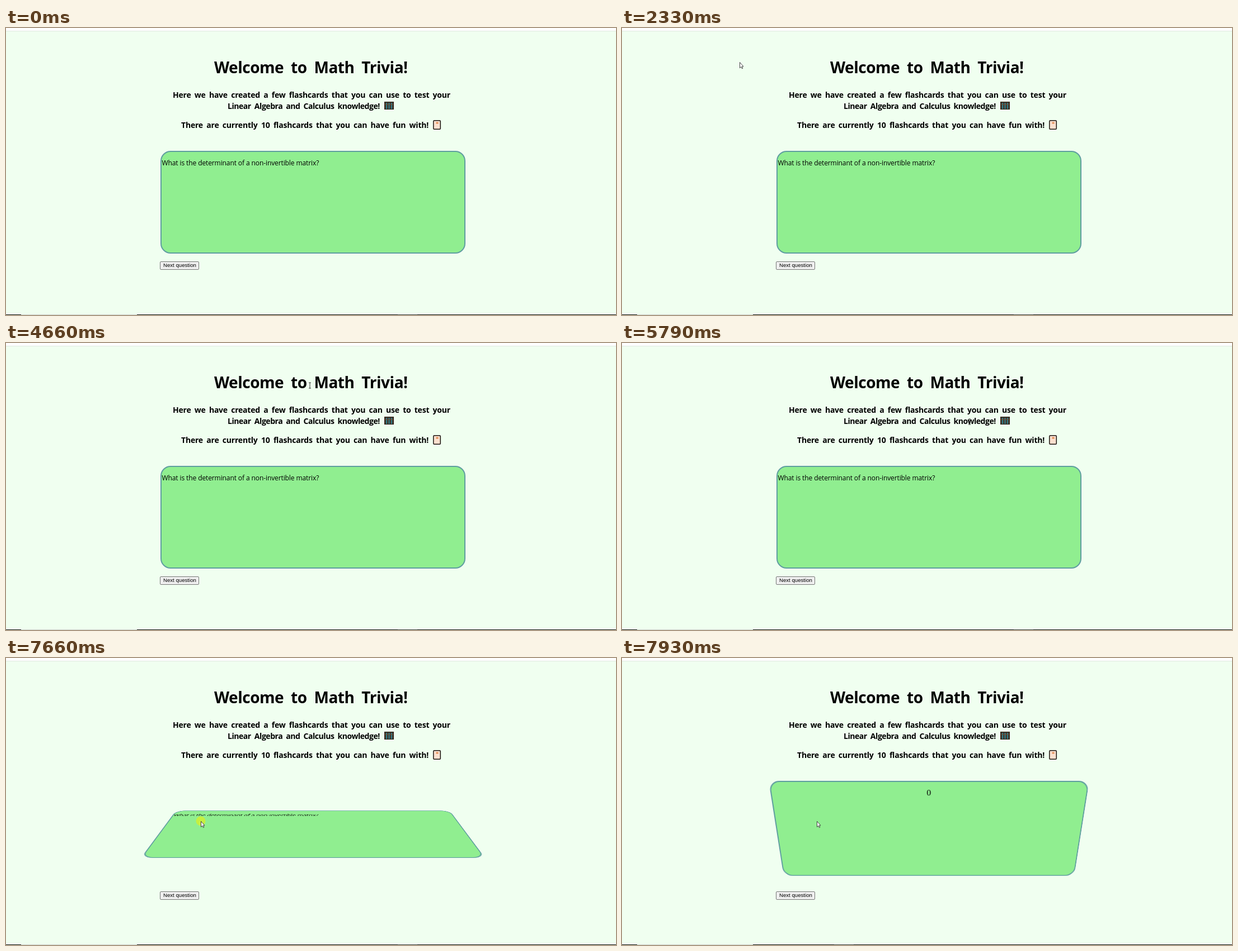
An HTML page for the animation above (7990 ms loop, 1090 px wide and 514 px high).

```html
<!DOCTYPE html>
<html lang="en">
<head>
<meta charset="utf-8">
<title>Math Trivia</title>
<style>
  html, body { margin: 0; width: 1090px; height: 514px; overflow: hidden; background: #f0fff0; }
  svg, .scene, .card, .face { position: absolute; left: 0; top: 0; }
  .pointer { pointer-events: none; }
  .comic { font-family: "Open Sans", sans-serif; }
  .bold { font-weight: 700; font-size: 14px; word-spacing: 2.9px; }
  .scene { left: 275.5px; top: 219.5px; width: 544.5px; height: 183.5px; perspective: 720px; }
  .card, .face { width: 100%; height: 100%; }
  .card { transform-style: preserve-3d; }
  .face {
    box-sizing: border-box; border: 2px solid #5f9ea0; border-radius: 18px;
    background: #90ee90; backface-visibility: hidden; white-space: nowrap;
  }
  .face span { position: absolute; line-height: 20px; }
  .front span { left: .5px; top: 9.5px; font-size: 12px; letter-spacing: -.1px; }
  .back { transform: rotateX(180deg); }
  .back span { left: 0; width: 100%; top: 9px; text-align: center; font: 15px/20px "Liberation Serif", serif; }
</style>
</head>
<body>
<svg width="1090" height="514">
  <rect width="1090" height="5" fill="#fff"/>
  <rect y="5" width="1090" height="1" fill="#dfe8df"/>
  <g class="comic">
    <text x="372" y="81" font-size="28" font-weight="700" letter-spacing="-.45" word-spacing="6">Welcome to Math Trivia!</text>
    <g class="bold">
      <text x="298" y="125" letter-spacing="-.22">Here we have created a few flashcards that you can use to test your</text>
      <text x="396" y="145" letter-spacing="-.45">Linear Algebra and Calculus knowledge!</text>
      <text x="313" y="179" letter-spacing="-.2">There are currently 10 flashcards that you can have fun with!</text>
    </g>
  </g>
  <g>
    <rect x="676.5" y="132.5" width="16" height="13" fill="#43362c" stroke="#2a1d14"/>
    <path d="M680 134v11M684.5 134v11M689 134v11" stroke="#2f7f8c" stroke-width="2"/>
    <path d="M677 137h15" stroke="#7a5232"/>
  </g>
  <g>
    <rect x="763.8" y="165.8" width="12.5" height="15.5" rx="1.5" fill="#fbe0cf" stroke="#1c1512" stroke-width="1.5"/>
    <ellipse cx="770.5" cy="170" rx="2.4" ry="1.5" fill="#e2894f"/>
  </g>
  <rect x="275.5" y="418.5" width="69" height="14" rx="1.5" fill="#efefef" stroke="#767676"/>
  <text x="281" y="428" font-size="9.65" font-family="Liberation Sans, Arial, sans-serif">Next question</text>
  <rect y="513" width="1090" height="1" fill="#111"/>
  <rect x="27" y="513" width="207" height="1" fill="#cfd3cf"/>
  <rect id="tab" y="513" width="35" height="1" fill="#3c3c3c"/>
</svg>

<div class="scene">
  <div class="card" id="card">
    <div class="face front comic"><span>What is the determinant of a non-invertible matrix?</span></div>
    <div class="face back"><span>0</span></div>
  </div>
</div>

<svg class="pointer" width="1090" height="514">
  <g id="cursor">
    <circle id="click" r="8.5" fill="rgb(240,240,0)" fill-opacity=".55"/>
    <path id="arrow" d="M.5.5V10.6L2.9 8.5 4.4 11.8 5.8 11.2 4.4 7.9H7Z" fill="#fff" stroke="#333" stroke-width=".9"/>
    <path id="beam" d="M-2-5H2M0-5V5M-2 5H2" fill="none" stroke="#222" stroke-width=".9"/>
  </g>
</svg>

<script>
const LOOP = 7990, ENTER = 510, CLICK = 7493;
const $ = id => document.getElementById(id);
const show = (id, on) => $(id).setAttribute('visibility', on ? 'visible' : 'hidden');

// Turning points and rests of the pointer: time, x, y
const path = [
  [ENTER, 1048, 400], [1250, 684, 84], [1950, 97, 145], [2330, 210, 61],
  [2860, 940, 97], [3200, 1010, 250], [3420, 904, 280], [3590, 960, 201],
  [4520, 502, 85], [5000, 700, 65], [5390, 430, 128], [5790, 621, 141],
  [5930, 621, 141], [6450, 108, 180], [6720, 203, 238], [6990, 203, 238],
  [7260, 229, 270], [7390, 229, 270], [7530, 348, 292], [LOOP, 348, 292]
];

const slope = (i, axis) => (path[i + 1][axis] - path[i][axis]) / (path[i + 1][0] - path[i][0]);

function tangent(i, axis) {
  if (i === 0 || i === path.length - 1) return 0;
  const a = slope(i - 1, axis), b = slope(i, axis);
  return a * b <= 0 ? 0 : 2 * a * b / (a + b);
}

// Monotone cubic through the path
function along(t, axis) {
  const i = Math.max(0, path.findIndex(p => p[0] > t) - 1);
  const p = path[i], q = path[i + 1], d = q[0] - p[0];
  const u = Math.max(0, (t - p[0]) / d), v = 1 - u;
  return p[axis] + (q[axis] - p[axis]) * u * u * (3 - 2 * u)
    + d * u * v * (v * tangent(i, axis) - u * tangent(i + 1, axis));
}

const flip = $('card').animate(
  [{ transform: 'translateY(0px) rotateX(0deg)' }, { transform: 'translateY(-3px) rotateX(180deg)' }],
  { delay: CLICK, duration: 750, easing: 'ease', fill: 'both' }
);
flip.pause();

function draw(t) {
  flip.currentTime = t;
  $('tab').setAttribute('x', t < 7700 ? 700 : 379);

  const x = Math.round(along(t, 1)), y = Math.round(along(t, 2));
  const under = document.elementFromPoint(x, y);
  const onText = !!under && under.matches('text, span');
  const visible = t >= ENTER;
  $('cursor').setAttribute('transform', `translate(${x} ${y})`);
  show('arrow', visible && !onText);
  show('beam', visible && onText);
  show('click', t > CLICK && t < CLICK + 290);
}

const start = performance.now();
function tick() {
  draw((performance.now() - start) % LOOP);
  requestAnimationFrame(tick);
}
tick();
</script>
</body>
</html>
```
